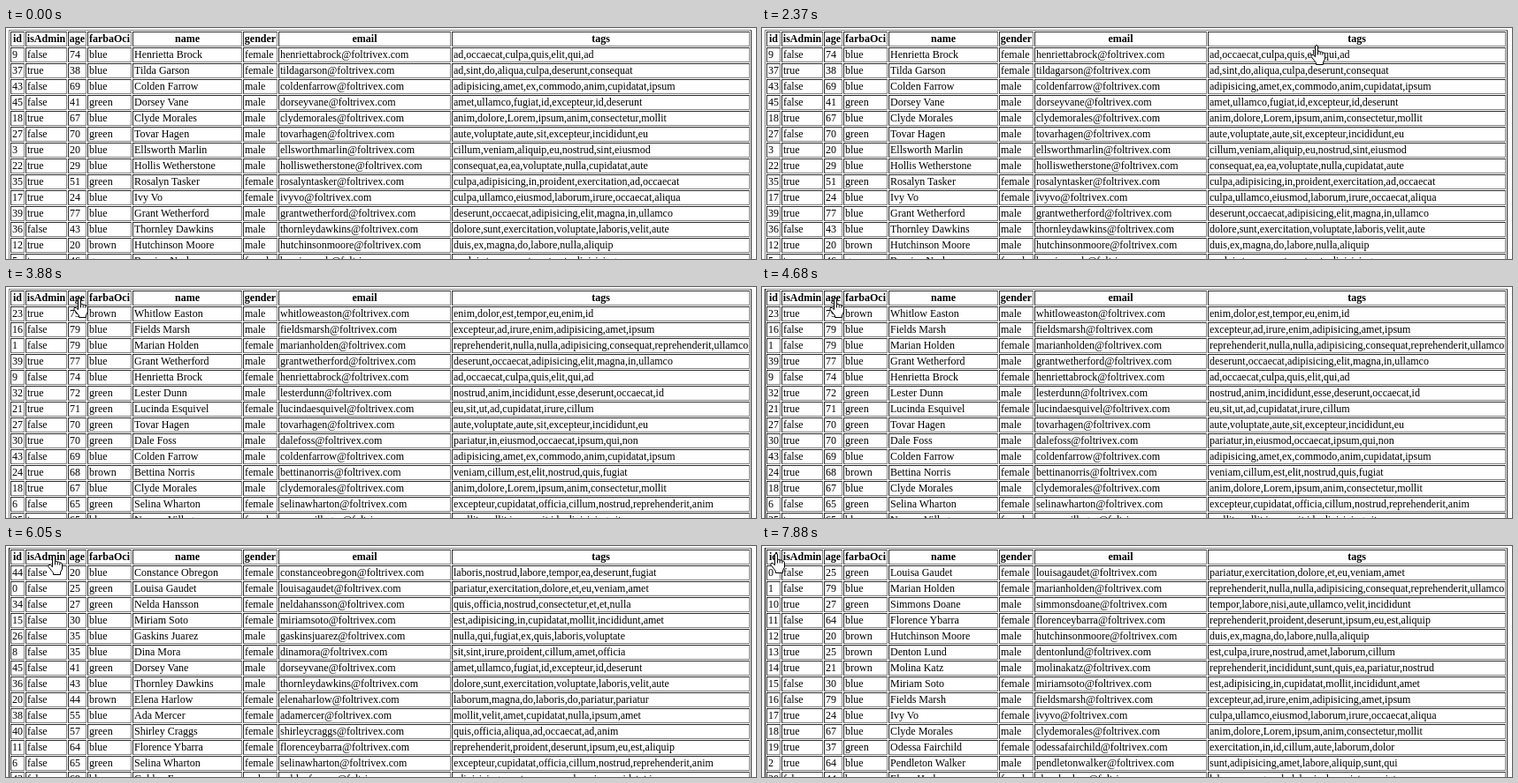
An HTML page for the animation above (8 s loop, 848x262 px).

```html
<!DOCTYPE html>
<html lang="en">
<head>
<meta charset="utf-8">
<title>Sortable table</title>
<style>
html, body { margin: 0; width: 100%; height: 100%; overflow: hidden; background: #fff; }
main { position: fixed; inset: 0; overflow: hidden; background: #fff; }
table {
  position: absolute; left: 3px; top: 2px; width: 840px;
  table-layout: fixed; border-collapse: separate; border-spacing: 1px;
  border: 1px outset gray; box-sizing: border-box;
  font: 12px/14px "Liberation Serif", "Times New Roman", serif; color: #000;
}
th, td {
  box-sizing: border-box; height: 17px; padding: 0 1px 1px;
  border: 1px inset gray; white-space: nowrap; text-align: left;
}
th { padding: 0 0 1px; text-align: center; font-weight: bold; }
#caret { position: absolute; left: 3px; top: 2px; bottom: 0; width: 1px; background: #000; }
svg { position: absolute; left: 0; top: 0; }
</style>
</head>
<body>
<main>
  <table><colgroup></colgroup><thead></thead><tbody></tbody></table>
  <div id="caret"></div>
  <svg id="hand" width="17" height="23" fill="#fff" stroke="#000" stroke-linejoin="round">
    <path d="M5.5 13V2a1.5 1.5 0 0 1 3 0V7.5q1.5-.8 2.7.6 1.8-.6 2.6.8 2.7-.2 2.7 2V16l-2 4v2.5H6.5V20.5L1 13.5q-.6-1.8 1-2.2 1.4 0 3.5 2.4z"/>
    <path d="M8.5 7.5v4M11.2 8.2v3.3M13.8 9.2v2.5"/>
  </svg>
</main>
<script>
const LOOP = 8000, BLINK = 530, PRESS = 125;
const heads = ['id', 'isAdmin', 'age', 'farbaOci', 'name', 'gender', 'email', 'tags'];
const widths = [16, 47, 21, 50, 124, 39, 195, 337];

// id | admin | age | eyes | name | gender | tags
const people = `
0|false|25|green|Louisa Gaudet|female|pariatur,exercitation,dolore,et,eu,veniam,amet
1|false|79|blue|Marian Holden|female|reprehenderit,nulla,nulla,adipisicing,consequat,reprehenderit,ullamco
2|true|64|blue|Pendleton Walker|male|sunt,adipisicing,amet,labore,aliquip,sunt,qui
3|true|20|blue|Ellsworth Marlin|male|cillum,veniam,aliquip,eu,nostrud,sint,eiusmod
4|true|48|green|Nella Frye|female|sit,ullamco,ex,id,cillum,minim,elit
5|true|46|green|Bernice Nash|female|ea,duis,tempor,aute,aute,ut,adipisicing
6|false|65|green|Selina Wharton|female|excepteur,cupidatat,officia,cillum,nostrud,reprehenderit,anim
7|true|29|brown|Irwin Quill|male|irure,ex,esse,quis,fugiat,qui,est
8|false|35|blue|Dina Mora|female|sit,sint,irure,proident,cillum,amet,officia
9|false|74|blue|Henrietta Brock|female|ad,occaecat,culpa,quis,elit,qui,ad
10|true|27|green|Simmons Doane|male|tempor,labore,nisi,aute,ullamco,velit,incididunt
11|false|64|blue|Florence Ybarra|female|reprehenderit,proident,deserunt,ipsum,eu,est,aliquip
12|true|20|brown|Hutchinson Moore|male|duis,ex,magna,do,labore,nulla,aliquip
13|true|25|brown|Denton Lund|male|est,culpa,irure,nostrud,amet,laborum,cillum
14|true|21|brown|Molina Katz|male|reprehenderit,incididunt,sunt,quis,ea,pariatur,nostrud
15|false|30|blue|Miriam Soto|female|est,adipisicing,in,cupidatat,mollit,incididunt,amet
16|false|79|blue|Fields Marsh|male|excepteur,ad,irure,enim,adipisicing,amet,ipsum
17|true|24|blue|Ivy Vo|female|culpa,ullamco,eiusmod,laborum,irure,occaecat,aliqua
18|true|67|blue|Clyde Morales|male|anim,dolore,Lorem,ipsum,anim,consectetur,mollit
19|true|37|green|Odessa Fairchild|female|exercitation,in,id,cillum,aute,laborum,dolor
20|false|44|brown|Elena Harlow|female|laborum,magna,do,laboris,do,pariatur,pariatur
21|true|71|green|Lucinda Esquivel|female|eu,sit,ut,ad,cupidatat,irure,cillum
22|true|29|blue|Hollis Wetherstone|male|consequat,ea,ea,voluptate,nulla,cupidatat,aute
23|true|79|brown|Whitlow Easton|male|enim,dolor,est,tempor,eu,enim,id
24|true|68|brown|Bettina Norris|female|veniam,cillum,est,elit,nostrud,quis,fugiat
25|true|65|blue|Noreen Villegas|female|mollit,mollit,ipsum,sit,id,adipisicing,sit
26|false|35|blue|Gaskins Juarez|male|nulla,qui,fugiat,ex,quis,laboris,voluptate
27|false|70|green|Tovar Hagen|male|aute,voluptate,aute,sit,excepteur,incididunt,eu
30|true|70|green|Dale Foss|male|pariatur,in,eiusmod,occaecat,ipsum,qui,non
32|true|72|green|Lester Dunn|male|nostrud,anim,incididunt,esse,deserunt,occaecat,id
34|false|27|green|Nelda Hansson|female|quis,officia,nostrud,consectetur,et,et,nulla
35|true|51|green|Rosalyn Tasker|female|culpa,adipisicing,in,proident,exercitation,ad,occaecat
36|false|43|blue|Thornley Dawkins|male|dolore,sunt,exercitation,voluptate,laboris,velit,aute
37|true|38|blue|Tilda Garson|female|ad,sint,do,aliqua,culpa,deserunt,consequat
38|false|55|blue|Ada Mercer|female|mollit,velit,amet,cupidatat,nulla,ipsum,amet
39|true|77|blue|Grant Wetherford|male|deserunt,occaecat,adipisicing,elit,magna,in,ullamco
40|false|57|green|Shirley Craggs|female|quis,officia,aliqua,ad,occaecat,ad,anim
41|true|46|blue|Jolie Marks|female|esse,anim,anim,qui,ipsum,veniam,cillum
42|true|54|brown|Harmon Tilley|male|minim,sint,elit,nulla,aute,sit,dolor
43|false|69|blue|Colden Farrow|male|adipisicing,amet,ex,commodo,anim,cupidatat,ipsum
44|false|20|blue|Constance Obregon|female|laboris,nostrud,labore,tempor,ea,deserunt,fugiat
45|false|41|green|Dorsey Vane|male|amet,ullamco,fugiat,id,excepteur,id,deserunt
`.trim().split('\n').map(line => {
  const row = line.split('|');
  const email = row[4].toLowerCase().replace(' ', '') + '@foltrivex.com';
  row.splice(6, 0, email);
  return row;
});

// Mouse presses: time, column, direction. The sort follows on release
// and is stable, so each one builds on the one before.
const presses = [
  [-LOOP, 7, 1], [1095, 7, -1], [1830, 7, 1], [3350, 2, -1], [4600, 2, 1],
  [5240, 1, -1], [5920, 1, 1], [7010, 0, -1], [7680, 0, 1]
];
// time, x and y of the fingertip
const path = [
  [120, 740, 250], [330, 705, 150], [520, 604, 62], [700, 640, 24], [880, 673, 11],
  [1080, 673, 11], [1150, 673, 9], [2160, 673, 9], [2370, 628, 19], [2650, 380, 38],
  [2930, 180, 20], [3130, 104, 3], [3270, 83, 12], [4750, 83, 12], [5170, 54, 10],
  [6500, 54, 10], [6900, 8, 3], [7000, 15, 5], [7470, 15, 5], [7660, 16, 8], [LOOP, 16, 8]
];

const $ = s => document.querySelector(s);
const show = (el, on) => { el.style.display = on ? 'block' : 'none'; };
const tr = (cells, tag) => `<tr>${cells.map(c => `<${tag}>${c}</${tag}>`).join('')}</tr>`;
const compare = (a, b) => a < b ? -1 : a > b ? 1 : 0;
const lastPress = t => presses.filter(p => p[0] <= t).length - 1;

let rows = people;
const views = presses.map(([, col, dir]) => {
  rows = [...rows].sort((a, b) => dir * compare(a[col], b[col]));
  return rows.slice(0, 14).map(r => tr(r, 'td')).join('');
});

$('colgroup').innerHTML = widths.map(w => `<col style="width:${w}px">`).join('');
$('thead').innerHTML = tr(heads, 'th');
const hand = $('#hand'), caret = $('#caret');

let shown = -1;
function draw(t) {
  const view = lastPress(t - PRESS);
  if (view !== shown) $('tbody').innerHTML = views[shown = view];

  // The text caret restarts its blinking at every press.
  const press = lastPress(t);
  show(caret, press > 0 && Math.floor((t - presses[press][0]) / BLINK) % 2 === 0);

  const i = path.findIndex(p => p[0] > t);
  show(hand, i > 0);
  if (i > 0) {
    const [t0, x0, y0] = path[i - 1], [t1, x1, y1] = path[i];
    const k = (t - t0) / (t1 - t0);
    const x = Math.round(x0 + (x1 - x0) * k), y = Math.round(y0 + (y1 - y0) * k);
    hand.style.transform = `translate(${x - 7}px, ${y}px)`;
  }
}

const start = performance.now();
function tick() {
  draw((performance.now() - start) % LOOP);
  requestAnimationFrame(tick);
}
tick();
</script>
</body>
</html>
```
